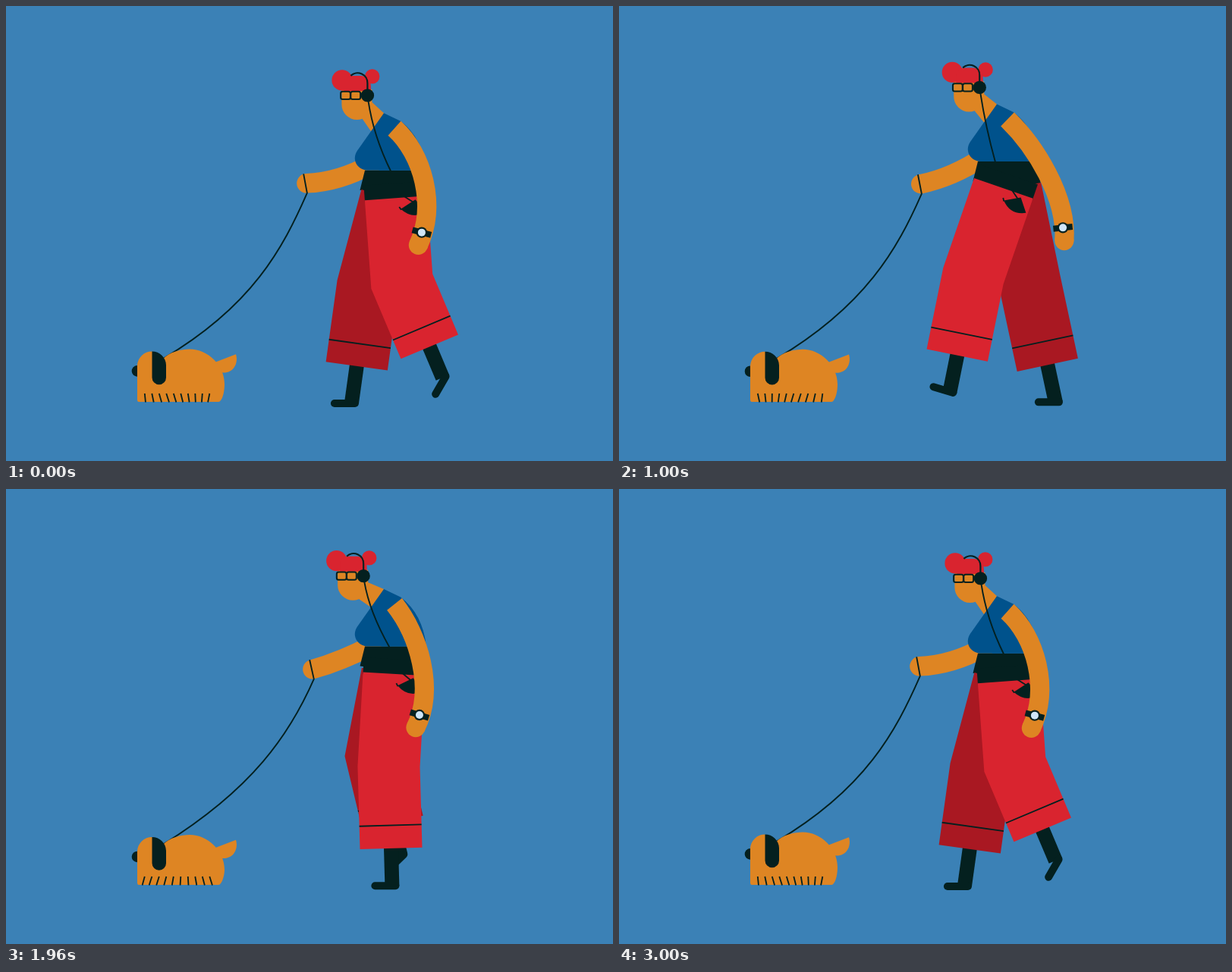
An HTML page with a canvas that plays this animation: 800x600 px, repeating every 3040 ms.

```html
<!DOCTYPE html>
<html lang="en">
<head>
<meta charset="utf-8">
<title>Walking the dog</title>
<style>
  html, body { margin: 0; width: 100%; height: 100%; overflow: hidden; background: #3b81b6; }
  canvas { display: block; }
</style>
</head>
<body>
<canvas id="stage" width="800" height="600"></canvas>
<script>
const ctx = document.getElementById('stage').getContext('2d');
const SKY = '#3b81b6', SKIN = '#de8523', RED = '#d9242f', DARK = '#a91822',
      BLUE = '#00528c', INK = '#04201f', GLASS = '#cfe6f8';
const LOOP = 3040, STEP = 40, CYCLE = 3000, BOB = 1500, PANT = 750;
const NEAR_SHIFT = 1485, LAND = 360, STANCE = 1420, SPEED = 0.12;
const GROUND = 523.3, STRIKE = 412.3, HALF = 41;

const { sin, cos, PI } = Math;
const rad = deg => deg * PI / 180;
const wave = (t, period, peak) => cos(2 * PI * (t - peak) / period);

function bezier(u, a, b, c, d) {
  const w = 1 - u;
  return w * w * w * a + 3 * w * w * u * b + 3 * w * u * u * c + u * u * u * d;
}

// point at (x, y) in axes placed at p and turned clockwise by a
const at = (p, a, x, y) =>
  [p[0] + x * cos(a) - y * sin(a), p[1] + x * sin(a) + y * cos(a)];

// angle of the line from p down to q, positive when q is further left
const lean = (p, q) => Math.atan2(p[0] - q[0], q[1] - p[1]);

function poly(color, ...pts) {
  ctx.beginPath();
  pts.forEach(p => ctx.lineTo(p[0], p[1]));
  ctx.closePath();
  ctx.fillStyle = color;
  ctx.fill();
}

function line(color, width, cap, ...pts) {
  ctx.beginPath();
  pts.forEach(p => ctx.lineTo(p[0], p[1]));
  ctx.strokeStyle = color;
  ctx.lineWidth = width;
  ctx.lineCap = cap;
  ctx.stroke();
}

function disc(color, x, y, r) {
  ctx.beginPath();
  ctx.arc(x, y, r, 0, 2 * PI);
  ctx.fillStyle = color;
  ctx.fill();
}

function shape(color, d) {
  ctx.fillStyle = color;
  ctx.fill(new Path2D(d));
}

function curve(color, width, d, cap = 'butt') {
  ctx.strokeStyle = color;
  ctx.lineWidth = width;
  ctx.lineCap = cap;
  ctx.stroke(new Path2D(d));
}

// the foot slides back with the ground, then swings forward on an arc
function step(phase) {
  const p = (phase + LAND) % CYCLE;
  if (p < STANCE) {
    return {
      ankle: [STRIKE + SPEED * p, GROUND],
      bend: rad(7 * sin(PI * Math.sqrt(p / STANCE))),
      pitch: 0
    };
  }
  const u = (p - STANCE) / (CYCLE - STANCE);
  return {
    ankle: [
      bezier(u, STRIKE + SPEED * STANCE, 608, 489, STRIKE),
      bezier(u, GROUND, 466, 470, GROUND)
    ],
    bend: rad(25 * sin(PI * u)),
    pitch: rad(110 * sin(PI * u) * (1 - u) - 20 * sin(PI * u ** 6))
  };
}

function leg(phase, hip, color, near) {
  const { ankle, bend, pitch } = step(phase);

  // bones shorten as the knee folds; the chain is turned and scaled to reach the ankle
  const fold = bend * 180 / PI;
  const upper = 143 - 0.66 * fold, lower = 112 - 0.85 * fold, calf = 51 - 0.3 * fold;
  const end = at([0, upper], -bend, 0, lower + calf);
  const k = Math.hypot(ankle[0] - hip[0], ankle[1] - hip[1]) / Math.hypot(...end);
  const thigh = lean(hip, ankle) - lean([0, 0], end), shin = thigh - bend;
  const knee = at(hip, thigh, 0, upper * k), hem = at(knee, shin, 0, lower * k);
  const mid = thigh - bend / 2, miter = HALF / cos(bend / 2);

  const heel = at(ankle, shin, 4.5, 0);
  line(INK, 19, 'butt', at(hem, shin, 0, -8), ankle);
  line(INK, 10, 'round', heel, [heel[0] - 27 * cos(pitch), heel[1] + 27 * sin(pitch)]);

  if (near) {
    poly(INK, at(hip, thigh, -HALF, -2), at(hip, thigh, HALF, -2),
      at(hip, thigh, HALF, 20), at(hip, thigh, -HALF, 20));
  }
  poly(color, at(hip, thigh, -HALF, 17.5), at(hip, thigh, HALF, 17.5),
    at(knee, mid, miter, 0), at(hem, shin, HALF, 0),
    at(hem, shin, -HALF, 0), at(knee, mid, -miter, 0));
  const trim = -0.28 * lower;
  line(INK, 1.8, 'butt', at(hem, shin, -HALF, trim), at(hem, shin, HALF, trim));

  if (near) {
    ctx.save();
    ctx.translate(hip[0], hip[1]);
    ctx.rotate(thigh);
    shape(INK, 'M25.5 21.5L5.5 32.5Q20 48 38.5 38.5Z');
    curve(INK, 1.8, 'M11 16L23 25M3.6 29.5L6 33.5');
    ctx.restore();
  }
}

function dog(t, d) {
  const top = 456.7 + d;
  const wag = t > 1200 && t < 1600 ? sin(PI * (t - 1200) / 400) ** 2 : 0;

  ctx.save();
  ctx.translate(279, 473 + d);
  ctx.rotate(-0.58 * wag);
  shape(SKIN, 'M-6 -1L24 -12.5C28 1 19 14 4 11.5Z');
  ctx.restore();

  disc(INK, 173, top + 26, 7.3);
  shape(SKIN, `M173 519V${top + 19}A19.5 19.5 0 0 1 192.5 ${top}L206 ${top + 11}
    C215 ${top} 232 ${top - 3} 242 ${top - 3}C266 ${top - 3} 288 ${top + 18} 288 ${top + 43}
    C288 508 286 516 283 520Q282 522 280 522H175Q173 522 173 519Z`);
  shape(INK, `M192.5 ${top}A18.5 18.5 0 0 1 211 ${top + 18}V${top + 34.5}
    a9.25 9.25 0 0 1 -18.5 0Z`);

  for (let i = 0; i < 10; i++) {
    const x = 182.8 + 9.5 * i, s = 3.7 * sin(rad(18 + 0.48 * t + 22 * i));
    line(INK, 1.8, 'butt', [x, 511], [x + s, 522.5]);
  }
}

function head(x, y, lift) {
  ctx.save();
  ctx.translate(x, y);
  shape(SKIN, 'M-34 -8V12A20 20 0 0 0 -14 32Q2 32 6 12V-8Z');
  disc(RED, -35 + 1.6 * lift, -20, 13.6);
  disc(RED, 7.3 - lift, -24 - lift, 9.7);
  ctx.beginPath();
  ctx.roundRect(-31, -26, 35.5, 20, [10, 14, 0, 0]);
  ctx.fill();
  curve(INK, 2.2, 'M0 -6V-16A13 13 0 0 0 -22 -26');
  ctx.lineWidth = 2;
  for (const left of [-35.3, -22.1]) {
    ctx.beginPath();
    ctx.roundRect(left, -5.2, 12.8, 10.4, 2.5);
    ctx.stroke();
  }
  disc(INK, 0, 0, 8.7);
  ctx.restore();
}

function frontArm([x, y], waist, sway) {
  const sy = waist - 5.5 - 4.5 * sway;
  const cx = (x + 482) / 2, cy = (y + sy) / 2 + 8.5 + 4 * sway;
  curve(SKIN, 25.5, `M482 ${sy}Q${cx} ${cy} ${x} ${y}`, 'round');
}

function leash([x, y], sway, collar) {
  const ex = x + 1.3 - 0.6 * sway, ey = y + 12.8;
  curve(INK, 1.9, `M${x - 3.8} ${y - 12.5}L${ex} ${ey}
    C${ex - 32} ${ey + 73} 325 395 208 ${collar}`);
}

function backArm(t, waist, sway) {
  const s = wave(t, CYCLE, 950);
  const shoulder = [512, waist - 55.5], hand = [556 + 31 * s, 316.5 - 7 * s * s];
  const tilt = rad(9 - 15 * s);
  const upper = at(shoulder, -rad(44 + 6 * sway), 0, 50);
  const elbow = at(hand, tilt + rad(10), 0, -58);
  curve(SKIN, 25.3, `M${shoulder}C${upper} ${elbow} ${hand}`);
  disc(SKIN, hand[0], hand[1], 12.6);
  const watch = at(hand, tilt, 0, -17.3);
  line(INK, 8, 'butt', at(watch, tilt, -12.7, 0), at(watch, tilt, 12.7, 0));
  disc(INK, watch[0], watch[1], 7.2);
  disc(GLASS, watch[0], watch[1], 5);
}

function draw(t) {
  const lift = wave(t, BOB, 25), sway = wave(t, BOB, 1300);
  const pant = 2.3 * wave(t, PANT, 490);
  const waist = 209.3 + 7.5 * lift;
  const ear = [474.2 + 3.3 * sway, waist - 96.3 - 3.8 * sway];
  const hand = [399.3 - 5 * sway, 235.5 - 2.5 * sway];
  const hip = [512.5, waist + 19];

  ctx.fillStyle = SKY;
  ctx.fillRect(0, 0, 800, 600);

  frontArm(hand, waist, sway);
  leash(hand, sway, 465.8 + pant);
  dog(t, pant);

  poly(INK, [473, waist], [545, waist], [554, waist + 14], [556, waist + 32],
    [553, waist + 38], [466.5, waist + 26]);
  leg(t, hip, DARK, false);
  leg(t + NEAR_SHIFT, hip, RED, true);

  // neck, shirt, then the head and its wire
  poly(SKIN, [ear[0] - 8, ear[1] + 29], [481, waist - 51.5], [490, waist - 58],
    [498, waist - 75.5], [ear[0] + 5, ear[1] + 8], [ear[0] - 8, ear[1] + 8]);
  ctx.save();
  ctx.translate(0, waist);
  shape(BLUE, `M498 -75.5L520 -65Q549 -43 554 0H476C463 -1 455 -14 463 -26
    L481 -51.5Z`);
  ctx.restore();
  head(ear[0], ear[1], lift);
  curve(INK, 1.9, `M${ear[0] + 1} ${ear[1] + 7}Q${ear[0] + 8} ${waist - 45}
    ${503 + 7 * wave(t, CYCLE, 2550)} ${waist + 1}`);
  backArm(t, waist, sway);
}

function tick() {
  const t = Math.floor(performance.now() % LOOP / STEP) * STEP;
  draw(t % CYCLE);
  requestAnimationFrame(tick);
}
tick();
</script>
</body>
</html>
```
